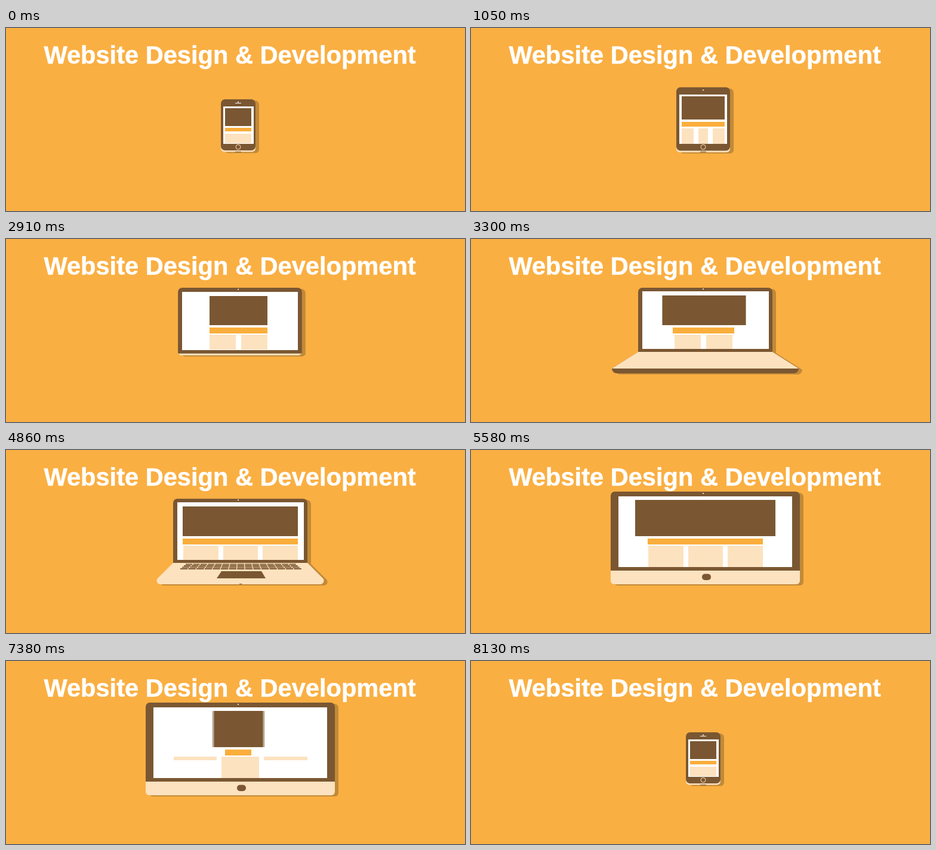
Animation, 769 px wide and 308 px high, one loop 8.19 s. Source, as an HTML page with a canvas:

```html
<!DOCTYPE html>
<html lang="en">
<head>
<meta charset="utf-8">
<title>Website Design &amp; Development</title>
<style>
  html, body { margin: 0; width: 100%; height: 100%; overflow: hidden; background: #faaf42; }
  canvas, svg { position: absolute; left: 0; top: 0; width: 769px; height: 308px; }
  text { font: bold 41.6px "Liberation Sans", Arial, sans-serif; fill: #fff; stroke: #fff; stroke-width: .5px; }
</style>
</head>
<body>
<canvas id="stage" width="769" height="308"></canvas>
<svg viewBox="0 0 769 308"><text x="63.4" y="60">Website Design &amp; Development</text></svg>
<script>
const ctx = document.getElementById('stage').getContext('2d');
const LOOP = 8190, STEP = 30;
const BROWN = '#7a5732', CREAM = '#fce2bf', ORANGE = '#faae3c', SHADE = '#c18a38', WHITE = '#fff';

// half: half width; side, head, foot: bezel; pad: page margin; inner, outer: side card
// edges from the centre; flare, depth: base; round: lower corners; full: page size.
const devices = [
  { cx: 389, half: 29, top: 120, bottom: 206, side: 3.5, head: 12, foot: 11, pad: 3.5,
    inner: 30, outer: 22, flare: 0, depth: 2.5, round: 7, full: 0 },
  { cx: 389, half: 59, top: 82, bottom: 207, side: 6, head: 13, foot: 12, pad: 4.5,
    inner: 4.5, outer: 48.5, flare: 0, depth: 3, round: 7, full: 1 },
  { cx: 392.5, half: 112.5, top: 82, bottom: 190, side: 6.5, head: 6, foot: 5, pad: 9.5,
    inner: 37, outer: 96, flare: 36, depth: 36, round: 0, full: 1 },
  { cx: 392.5, half: 158.5, top: 70, bottom: 203, side: 13, head: 8, foot: 6, pad: 8,
    inner: 39.5, outer: 112, flare: 0, depth: 23, round: 0, full: 1 }
];

// When each change runs; page(i) staggers hero, bar and cards.
const changes = [
  { body: [690, 1380] },
  { body: [2100, 3200], base: [2940, 3300], page: i => [3130 + 100 * i, 3500 + 155 * i] },
  { body: [4860, 5400], page: i => [5200 + 450 * i, 5950 + 190 * i] },
  { body: [7400, 7960], page: i => i < 2 ? [7110, 7475 - 105 * i] : [7400, 7960] }
];
const bodyTime = c => c.body;
const baseTime = c => c.base || c.body;
const pageTime = i => c => c.page ? c.page(i) : c.body;

const ease = p => (1 - Math.cos(Math.PI * Math.min(1, Math.max(0, p)))) / 2;
const ramp = (t, a, b) => ease((t - a) / (b - a));
const pulse = (t, a, b, c, d) => ramp(t, a, b) - ramp(t, c, d);

// The device shape at time t, by the timing of one part.
function blend(t, time) {
  let i = 0;
  while (i < 3 && t >= time(changes[i + 1])[0]) i++;
  const p = ramp(t, ...time(changes[i])), next = devices[(i + 1) % 4], mix = {};
  for (const [key, v] of Object.entries(devices[i])) mix[key] = v + (next[key] - v) * p;
  mix.page = mix.half - mix.side - mix.pad;
  return mix;
}

function box(left, top, right, bottom, color, alpha = 1) {
  const [a, b, c, d] = [left, top, right, bottom].map(Math.round);
  ctx.globalAlpha = alpha;
  ctx.fillStyle = color;
  ctx.fillRect(a, b, c - a, d - b);
  ctx.globalAlpha = 1;
}

function poly(points, color) {
  ctx.fillStyle = color;
  ctx.beginPath();
  points.forEach(([x, y]) => ctx.lineTo(x, y));
  ctx.closePath();
  ctx.fill();
}

function pill(x, y, w, h, r, color) {
  ctx.fillStyle = color;
  ctx.beginPath();
  ctx.roundRect(x, y, w, h, r);
  ctx.fill();
}

function fillBody(d, color) {
  pill(d.cx - d.half, d.top, d.half * 2, d.bottom - d.top, [7, 7, d.round, d.round], color);
}

function fillBase(f, color) {
  const r = f.lip ? Math.min(8, f.lip) : 6;
  const [ex, ey] = f.lip ? [f.right, f.end - f.lip] : [f.x1, f.top];
  ctx.fillStyle = color;
  ctx.beginPath();
  ctx.moveTo(f.x0, f.top);
  if (f.lip) ctx.lineTo(f.left, ey);
  ctx.arcTo(f.left, f.end, f.right, f.end, r);
  ctx.arcTo(f.right, f.end, ex, ey, r);
  ctx.lineTo(ex, ey);
  ctx.lineTo(f.x1, f.top);
  ctx.closePath();
  ctx.fill();
}

function drawStand(p) {
  if (!p) return;
  ctx.save();
  ctx.translate(0, (p - 1) * 23);
  box(341, 246, 451, 248, SHADE);
  poly([[357, 224], [427, 224], [431, 242], [446, 247], [341, 247], [353, 243]], WHITE);
  poly([[371, 226], [427, 226], [428.5, 232]], BROWN);
  box(340, 246, 446, 247, BROWN, .6);
  ctx.restore();
}

function drawKeys(alpha) {
  if (!alpha) return;
  ctx.globalAlpha = alpha;
  ctx.fillStyle = BROWN;
  for (let row = 0; row < 4; row++) {
    const x = 301 - row * 3, w = (487 + row * 3 - x) / 15;
    for (let i = 0; i < 15; i++) ctx.fillRect(x + i * w, 191.5 + row * 2.5, w - 1.3, 1.9);
  }
  poly([[361, 204], [428, 204], [435, 216], [353, 216]], BROWN);
  box(391, 225, 395, 226, BROWN, alpha);
}

function drawPage(t, d) {
  const [hero, bar, cards] = [0, 1, 2].map(i => blend(t, pageTime(i)));
  const left = d.cx - d.half + d.side, right = d.cx + d.half - d.side;
  const top = d.top + d.head, end = d.bottom - d.foot;
  const heroTop = top + d.pad * .75, heroEnd = 165 - 20 * d.full;
  box(left, top, right, end, WHITE);
  ctx.save();
  ctx.beginPath();
  ctx.rect(Math.round(left), Math.round(top), Math.round(right - left), Math.round(end - top));
  ctx.clip();

  // Fast widening or narrowing softens the sides of the hero.
  const speed = Math.abs(hero.page - blend(t - STEP, pageTime(0)).page);
  const smear = Math.max(0, (speed - 3) / 2);
  for (let i = 0; i <= 4; i++) {
    const w = hero.page + smear * i / 4;
    box(hero.cx - w, heroTop, hero.cx + w, heroEnd, BROWN, i ? .25 : 1);
  }
  box(bar.cx - bar.page, 168 - 19 * d.full, bar.cx + bar.page, 174 - 15 * d.full, ORANGE);

  const y = 178 - 17 * d.full, h = 16 + 20 * d.full;
  const sideEnd = y + h * (1 - ramp(t, 7110, 7480));
  const mid = Math.max(0, cards.inner - 8);
  box(cards.cx - mid, y, cards.cx + mid, y + h, CREAM);
  if (cards.outer > cards.inner) {
    box(cards.cx - cards.outer, y, cards.cx - cards.inner, sideEnd, CREAM);
    box(cards.cx + cards.inner, y, cards.cx + cards.outer, sideEnd, CREAM);
  }
  ctx.restore();
}

function drawDetails(t, d) {
  const cam = d.top + d.head * .38;
  pill(388, cam - 1, 2, 2, 1, WHITE);
  box(384, cam + 1.4, 394, cam + 2.6, WHITE, 1 - pulse(t, 690, 900, 7800, 7960));

  const ring = 1 - pulse(t, 2100, 2400, 7750, 7960);
  ctx.globalAlpha = ring;
  ctx.strokeStyle = CREAM;
  ctx.beginPath();
  ctx.arc(389, 200.3, 4, 0, 7);
  ctx.stroke();
  box(384, d.bottom + 1.6, 394, d.bottom + 2.6, BROWN, ring);

  ctx.globalAlpha = pulse(t, 5250, 5430, 7400, 7560);
  pill(387, 208.5, 15, 10.5, 5, BROWN);
  ctx.globalAlpha = 1;
}

function draw(t) {
  box(0, 0, 769, 308, '#faaf42');
  const d = blend(t, bodyTime), { flare, depth } = blend(t, baseTime);
  d.top -= 3 * pulse(t, 7380, 7470, 7470, 7590) + 6 * pulse(t, 7800, 7950, 7950, 8130);

  const lip = pulse(t, 3000, 3240, 3330, 3540);
  const reach = d.half + flare + 8 * lip;
  const base = {
    x0: d.cx - d.half, x1: d.cx + d.half, top: d.bottom - d.round,
    left: d.cx - reach, right: d.cx + reach, end: d.bottom + depth, lip: 8 * lip
  };

  drawStand(pulse(t, 5700, 6100, 7110, 7290));
  ctx.save();
  ctx.translate(6, 2);
  fillBody(d, SHADE);
  fillBase(base, SHADE);
  ctx.restore();

  fillBase(base, lip ? BROWN : CREAM);
  if (lip) {
    const y = base.end - base.lip;
    poly([[base.x0, base.top], [base.left, y], [base.right, y], [base.x1, base.top]], CREAM);
  }
  fillBody(d, BROWN);
  drawPage(t, d);
  drawKeys(pulse(t, 3420, 3720, 4860, 5040));
  drawDetails(t, d);
}

function tick() {
  const t = performance.now() % LOOP;
  draw(Math.floor(t / STEP) * STEP);
  requestAnimationFrame(tick);
}
tick();
</script>
</body>
</html>
```
